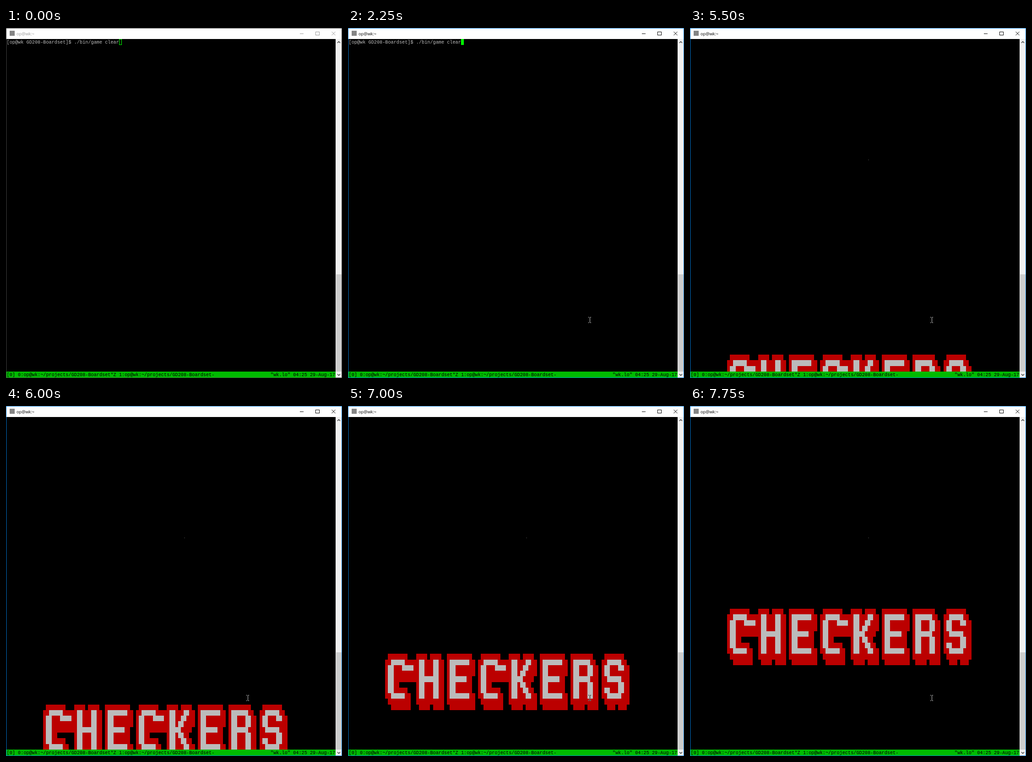
Animation of 734 by 763 pixels, one loop 8 s. Source, as an HTML page:

```html
<!DOCTYPE html>
<html lang="en">
<head>
<meta charset="utf-8">
<title>Terminal</title>
<style>
  html, body { margin: 0; width: 100%; height: 100%; overflow: hidden; background: #000; }
  svg { display: block; width: 734px; height: 763px; }
  .crisp { shape-rendering: crispEdges; }
  .mono { font: 10.222px "Liberation Mono", "Courier New", monospace; white-space: pre; }
  .title { font: 9.2px "Open Sans", "Noto Sans", sans-serif; }
  #beam { mix-blend-mode: difference; }
</style>
</head>
<body>
<svg viewBox="0 0 734 763">
  <rect width="734" height="763"/>

  <g class="crisp">
    <path id="shade" fill="#bb0000"/>
    <path id="face" fill="#bbbbbb"/>
    <rect id="speck" x="389" y="287" width="2" height="1" fill="#444"/>
  </g>

  <g id="prompt">
    <text id="line" class="mono" x="1.6" y="34" fill="#bbbbbb"></text>
    <rect id="cursor" class="crisp" y="24.5" width="5" height="12" stroke="#00ff00"/>
  </g>

  <rect class="crisp" x="1" y="749" width="719" height="13" fill="#00bb00"/>
  <text id="left" class="mono" x="1.6" y="759"></text>
  <text id="right" class="mono" x="578.1" y="759"></text>

  <g class="crisp">
    <rect x="720" y="24" width="13" height="738" fill="#f0f0f0"/>
    <rect x="721" y="537" width="12" height="212" fill="#cdcdcd"/>
  </g>
  <path d="M724 32.5l3-3 3 3M724 754.5l3 3 3-3" fill="none" stroke="#404040" stroke-width="1.5"/>

  <rect class="crisp" width="734" height="24" fill="#fff"/>
  <rect class="crisp" x="8" y="6" width="11" height="11" fill="#858585"/>
  <text id="name" class="title" x="23" y="15.5"></text>
  <g id="buttons" fill="none">
    <path class="crisp" d="M642 12.5h8M676.5 8.5h8v7h-8z"/>
    <path d="M711.5 8l8 8M719.5 8l-8 8"/>
  </g>
  <rect id="frame" class="crisp" x=".5" y=".5" width="733" height="762" fill="none"/>

  <path id="beam" class="crisp" fill="none" stroke="#cccccc"
        d="M525 630.5h2M529 630.5h2M528.5 631v11M525 642.5h2M529 642.5h2"/>
</svg>
<script>
const LOOP = 8000, STEP = 250;
const FOCUS_AT = 2250, BEAM_AT = 250, BANNER_AT = 5500;
const STATUS_ROW = 59;

const $ = id => document.getElementById(id);
const set = (id, attrs) => {
  for (const key in attrs) $(id).setAttribute(key, attrs[key]);
};
const show = (id, on) => set(id, { visibility: on ? 'visible' : 'hidden' });

const host = 'op@wk', project = 'GD208-Boardset';
const command = `[${host} ${project}]$ ./bin/game clear`;
const task = n => `${n}:${host}:~/projects/${project}`;
$('name').textContent = host + ':~';
$('left').textContent = `[0] ${task(0)}*Z ${task(1)}-`;
$('right').textContent = '"wk.lo" 04:25 29-Aug-17';

// Terminal cell to pixel
const px = col => Math.round(1.6 + 6.133 * col);
const py = row => Math.round(24.9 + 12.27 * row);

// Letter strokes on a 10 by 10 grid: x, y, width, height
const strokes = {
  C: '2151 1225 6221 6261 2751',
  H: '1127 6127 3431',
  E: '1127 3151 3441 3751',
  K: '1127 6121 5221 4321 3421 4521 5621 6721',
  R: '1127 3141 6222 3441 6523',
  S: '2151 1222 6221 2451 6522 1621 2751'
};

const grid = () => Array.from({ length: 10 }, () => Array(10).fill(false));

function makeLetter(ch) {
  const face = grid(), shade = grid();
  for (const s of strokes[ch].split(' ')) {
    const [x, y, w, h] = [...s].map(Number);
    for (let r = y; r < y + h; r++) face[r].fill(true, x, x + w);
  }
  // Outline every face cell, then drop a copy one cell down and right
  face.forEach((row, r) => row.forEach((on, c) => {
    if (!on) return;
    for (let dr = -1; dr <= 2; dr++)
      for (let dc = -1; dc <= 2; dc++)
        if (Math.abs(dr - dc) < 3) shade[r + dr][c + dc] = true;
  }));
  // Corners reached by only one of the two outlines
  const near = (r, c) => {
    for (let dr = -1; dr <= 1; dr++)
      for (let dc = -1; dc <= 1; dc++)
        if (face[r + dr] && face[r + dr][c + dc]) return true;
    return false;
  };
  shade.forEach((row, r) => row.forEach((_, c) => {
    row[c] = near(r, c) || near(r - 1, c - 1);
  }));
  for (const row of shade.slice(1, 9))
    row.fill(true, row.indexOf(true), row.lastIndexOf(true) + 1);
  if (ch === 'S') shade[9][5] = false;
  return { face, shade };
}

const banner = [...'CHECKERS'].map(makeLetter);

function layerPath(layer, top) {
  let d = '';
  banner.forEach((letter, i) => {
    letter[layer].forEach((row, r) => {
      if (top + r >= STATUS_ROW) return;
      const y = py(top + r), h = py(top + r + 1) - y;
      row.forEach((on, c) => {
        if (!on) return;
        const x = px(13 + 11 * i + c), w = px(14 + 11 * i + c) - x;
        d += `M${x} ${y}h${w}v${h}h${-w}z`;
      });
    });
  });
  return d;
}

function typedLength(t) {
  const marks = [[4750, 34], [4500, 35], [4250, 36], [4000, 38], [3750, 39]];
  const hit = marks.find(([at]) => t >= at);
  return hit ? hit[1] : command.length;
}

let lastTop;
function drawBanner(t) {
  const top = t < BANNER_AT ? STATUS_ROW
    : Math.floor(56.73 - 2.42 * Math.floor((t - BANNER_AT) / STEP));
  if (top === lastTop) return;
  lastTop = top;
  for (const layer of ['shade', 'face']) set(layer, { d: layerPath(layer, top) });
}

function render(t) {
  const focused = t >= FOCUS_AT, playing = t >= BANNER_AT;
  const ink = focused ? '#000' : '#999';
  set('name', { fill: ink });
  set('buttons', { stroke: ink });
  set('frame', { stroke: focused ? '#0078d7' : '#444' });

  const n = typedLength(t);
  $('line').textContent = command.slice(0, n);
  set('cursor', { x: px(n) + 0.5, fill: focused ? '#00ff00' : 'none' });

  show('prompt', !playing);
  show('speck', playing);
  show('beam', t >= BEAM_AT);
  drawBanner(t);
}

const start = performance.now();
function tick() {
  render((performance.now() - start) % LOOP);
  requestAnimationFrame(tick);
}
tick();
</script>
</body>
</html>
```
